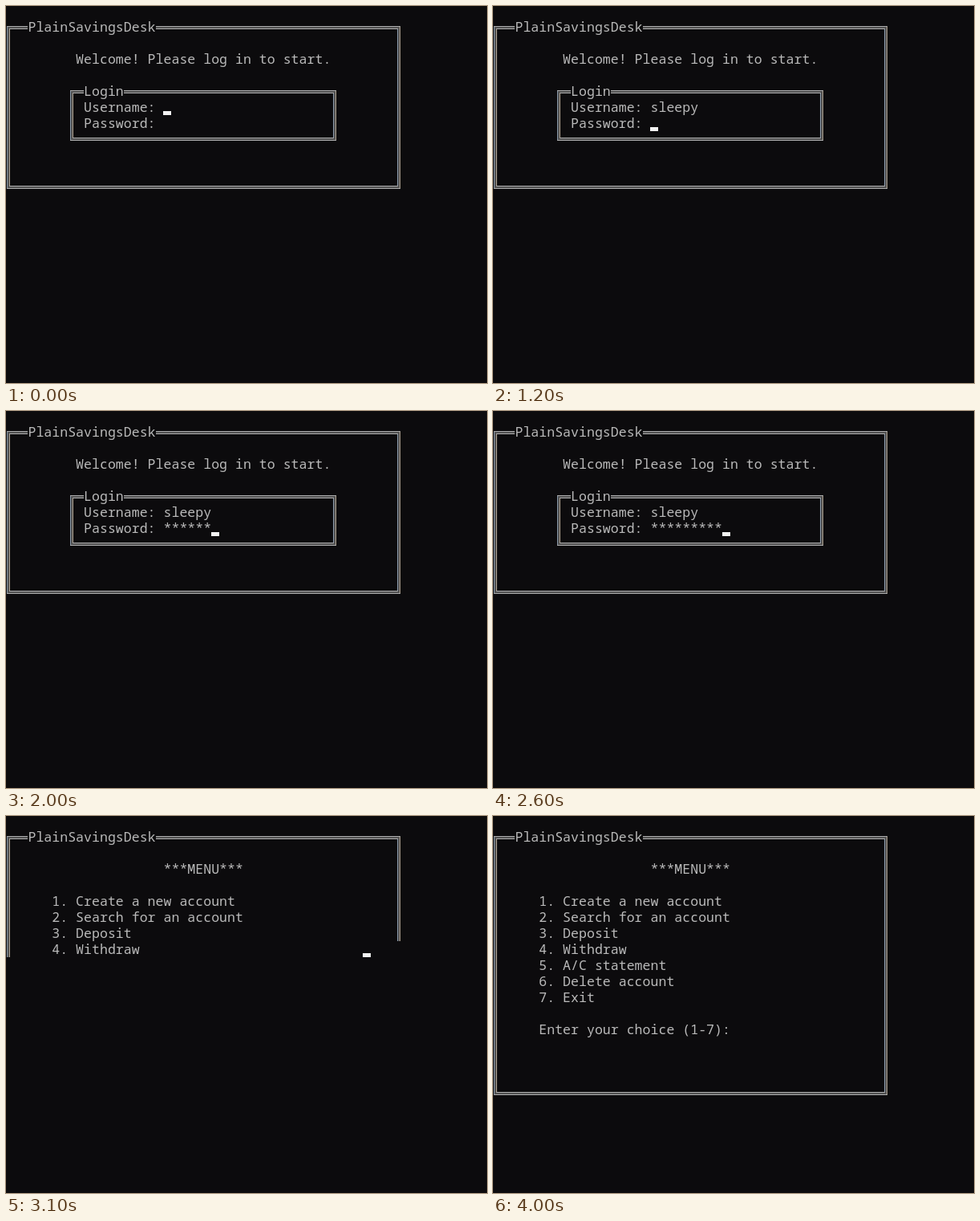
An HTML page with a canvas for the animation above (4.1 s loop, 600 px wide and 470 px high).

```html
<!DOCTYPE html>
<html lang="en">
<head>
<meta charset="utf-8">
<title>Terminal login</title>
<style>
  html, body { margin: 0; width: 600px; height: 470px; overflow: hidden; background: #0c0b0d; }
  canvas { display: block; }
</style>
</head>
<body>
<canvas id="screen" width="600" height="470"></canvas>
<script>
const ctx = document.getElementById('screen').getContext('2d');
const LOOP = 4100, STEP = 100;
const CELL_W = 9.945, CELL_H = 19.93, COLS = 50;
const TITLE = 'PlainSavingsDesk', USER = 'sleepy';
const BACK = '#0c0b0d', TEXT = '#bababa', CURSOR = '#f2f2f2';
const LINE = '#acacac', GAP = '#505050', EDGE_LEFT = '#8797a8', EDGE_RIGHT = '#aca08f';
// Direction of the two arms of each corner
const CORNERS = { '╔': [1, 1], '╗': [-1, 1], '╚': [1, -1], '╝': [-1, -1] };

const cellX = col => -2.4 + col * CELL_W;
const midY = row => 6.9 + row * CELL_H;

function box(lead, title, width, lines) {
  const inner = width - 2;
  return [
    '╔' + ('═'.repeat(lead) + title).padEnd(inner, '═') + '╗',
    ...lines.map(line => '║' + line.padEnd(inner) + '║'),
    '╚' + '═'.repeat(inner) + '╝'
  ];
}

const indent = (n, line) => ' '.repeat(n) + line;

function loginScreen(user, password) {
  const form = box(1, 'Login', 34, [' Username: ' + user, ' Password: ' + password]);
  return box(2, TITLE, COLS, [
    '', indent(8, 'Welcome! Please log in to start.'), '',
    ...form.map(line => indent(7, line)), '', ''
  ]);
}

const choices = ['Create a new account', 'Search for an account', 'Deposit',
  'Withdraw', 'A/C statement', 'Delete account', 'Exit'];
const menu = box(2, TITLE, COLS, [
  '', indent(19, '***MENU***'), '',
  ...choices.map((name, i) => indent(5, `${i + 1}. ${name}`)),
  '', indent(5, 'Enter your choice (1-7):'), '', '', ''
]);

function rect(x0, y0, x1, y1, color) {
  ctx.fillStyle = color;
  ctx.fillRect(Math.min(x0, x1), Math.min(y0, y1), Math.abs(x1 - x0), Math.abs(y1 - y0));
}

function horizontal(x0, x1, y) {
  rect(x0, y - 1, x1, y + 1, GAP);
  rect(x0, y - 2, x1, y - 1, LINE);
  rect(x0, y + 1, x1, y + 2, LINE);
}

function vertical(x, y0, y1) {
  rect(x - 1, y0, x + 1, y1, GAP);
  rect(x - 2, y0, x - 1, y1, EDGE_LEFT);
  rect(x + 1, y0, x + 2, y1, EDGE_RIGHT);
}

function drawCell(ch, col, row) {
  const x = cellX(col), y = midY(row);
  const left = Math.round(x), right = Math.round(x + CELL_W);
  const top = Math.round(y - CELL_H / 2), bottom = Math.round(y + CELL_H / 2);
  const cx = Math.round(x + CELL_W / 2), cy = Math.round(y);

  if (ch === '═') {
    horizontal(left, right, cy);
  } else if (ch === '║') {
    vertical(cx, top, bottom);
  } else if (CORNERS[ch]) {
    const [dx, dy] = CORNERS[ch];
    vertical(cx, cy - 2 * dy, dy > 0 ? bottom : top);
    horizontal(cx + dx, dx > 0 ? right : left, cy);
    rect(cx - 2 * dx, cy - 2 * dy, cx + dx, cy - dy, LINE);
  } else if (ch !== ' ') {
    ctx.fillStyle = TEXT;
    ctx.fillText(ch, x, y + 5.6);
  }
}

function drawScreen(lines, limit = Infinity) {
  lines.forEach((line, r) => [...line].forEach((ch, c) => {
    if (r * COLS + c < limit) drawCell(ch, c, r + 1);
  }));
}

function drawCursor(col, row) {
  ctx.fillStyle = CURSOR;
  ctx.fillRect(Math.round(cellX(col) - 0.1), Math.round(midY(row) + 4.4), 10, 5);
}

function starCount(step) {
  if (step <= 20) return Math.max(0, Math.round((step - 12) * 0.75));
  return 6 + Math.round((step - 20) / 2);
}

function render(time) {
  const step = Math.floor(time / STEP);
  ctx.fillStyle = BACK;
  ctx.fillRect(0, 0, 600, 470);
  ctx.font = '16.55px "Noto Sans Mono", monospace';

  if (step < 28) {
    const typed = Math.min(6, Math.round(step * 6 / 7));
    const stars = starCount(step);
    drawScreen(loginScreen(USER.slice(0, typed), '*'.repeat(stars)));
    if (step < 10) drawCursor(20 + typed, 6);
    else drawCursor(20 + stars, 7);
    return;
  }

  // The menu is printed cell by cell, line after line
  const total = menu.length * COLS;
  const printed = Math.max(0, Math.min(total, Math.round(395 + (step - 31) * 227.5)));
  drawScreen(menu, printed);
  if (printed < total) drawCursor(printed % COLS, 1 + Math.floor(printed / COLS));
  else if (step < 39) drawCursor(31, 13);
}

function tick() {
  render(performance.now() % LOOP);
  requestAnimationFrame(tick);
}
tick();
</script>
</body>
</html>
```
